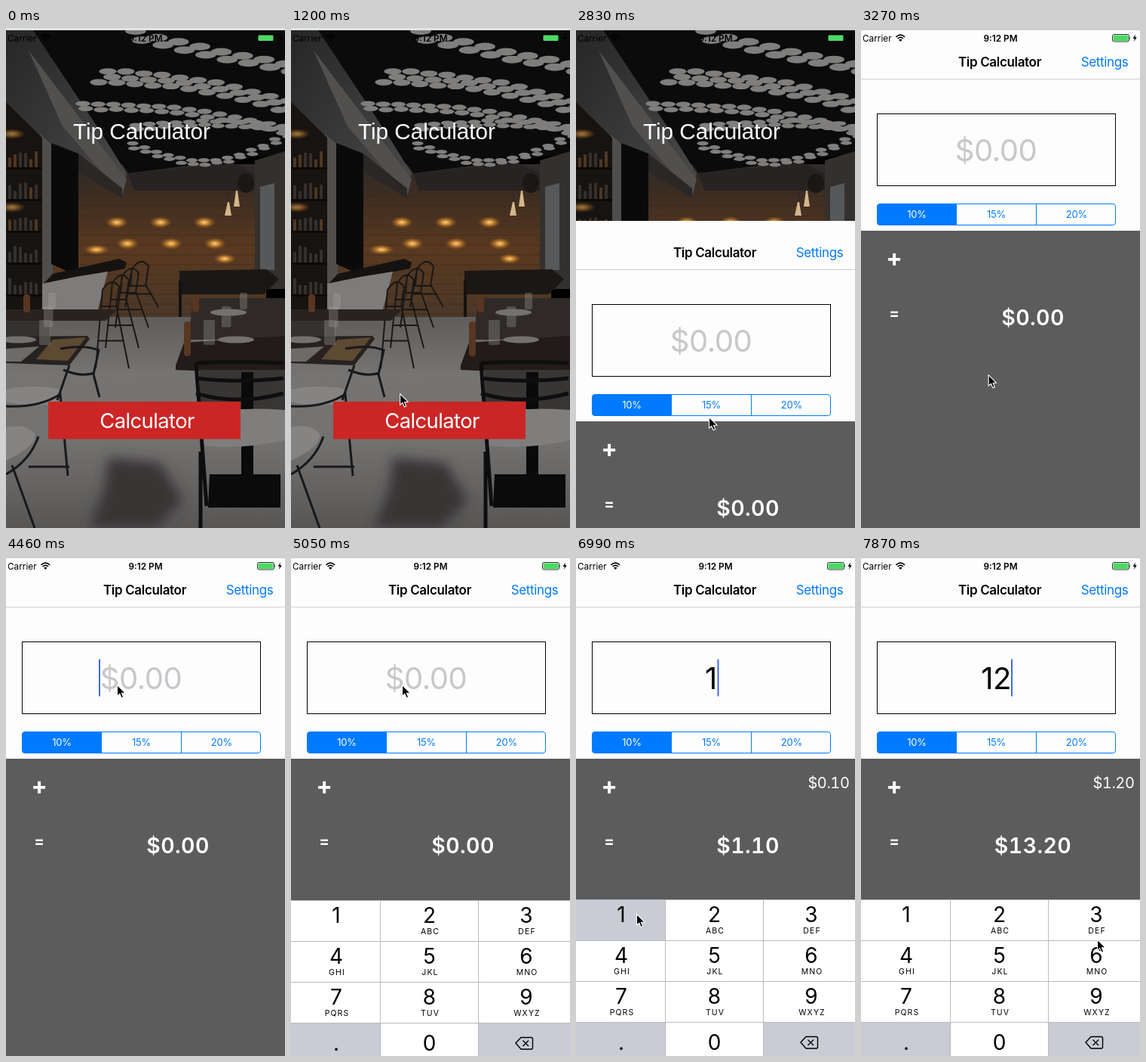
An HTML page for the animation above (8000 ms loop, 370 by 661 pixels).

```html
<!DOCTYPE html>
<html lang="en">
<head>
<meta charset="utf-8">
<title>Tip Calculator</title>
<style>
html, body { margin: 0; width: 100%; height: 100%; overflow: hidden; background: #000; }
svg { display: block; width: 370px; height: 661px; }
text { font-family: Inter, "Open Sans", sans-serif; white-space: pre; }
.mid { text-anchor: middle; }
.end { text-anchor: end; }
.title { font: 29.7px "Liberation Sans", Arial, sans-serif; }
.bar { font-size: 17px; letter-spacing: -.33px; }
.semi { font-weight: 600; }
.big { font-size: 40px; letter-spacing: -.5px; }
.seg { font-size: 13px; letter-spacing: -.2px; }
.total { font-size: 28.5px; font-weight: 600; letter-spacing: .4px; }
.tab { font-variant-numeric: tabular-nums; }
.digit { font-size: 28px; }
.sub { font-size: 10.5px; letter-spacing: 1.1px; }
</style>
</head>
<body>
<svg viewBox="0 0 370 661">
<defs>
  <linearGradient id="floor" x2="0" y2="1"><stop stop-color="#5b5958"/><stop offset=".3" stop-color="#757473"/><stop offset=".6" stop-color="#737271"/><stop offset="1" stop-color="#575655"/></linearGradient>
  <linearGradient id="wall" x2="0" y2="1"><stop stop-color="#2e2a28"/><stop offset=".2" stop-color="#3d2d22"/><stop offset=".55" stop-color="#59391f"/><stop offset="1" stop-color="#4b3828"/></linearGradient>
  <linearGradient id="side" x2="1" y2="1"><stop stop-color="#262626"/><stop offset="1" stop-color="#4b4a49"/></linearGradient>
  <radialGradient id="glow"><stop stop-color="#ffd080"/><stop offset=".4" stop-color="#c08030"/><stop offset="1" stop-color="#8a5420" stop-opacity="0"/></radialGradient>
  <filter id="soft" x="-30%" y="-30%" width="160%" height="160%"><feGaussianBlur stdDeviation="8"/></filter>
</defs>

<g id="home">
  <rect y="370" width="370" height="291" fill="url(#floor)"/>
  <path d="M60 180H345V382H60Z" fill="url(#wall)"/>
  <g id="planks" stroke="#33241a" stroke-opacity=".5"/>
  <path d="M0 0H40L160 192 152 224 60 158 0 105Z" fill="url(#side)"/>
  <path d="M30 30L160 200 154 222 75 130Z" fill="#51504f"/>
  <path d="M45 140L62 155V372H45Z" fill="#4f4e4d"/>
  <path d="M0 98L48 145V372H0Z" fill="#171311"/>
  <g id="shelf"/>
  <path d="M34 0H370V166L162 192Z" fill="#0b0b0b"/>
  <path d="M162 192L300 178 330 192V215H170Z" fill="#262322"/>
  <g id="discs" fill="#7f7e7d"/>
  <path d="M60 152L96 166V328L60 312Z" fill="#0b0a0a"/>
  <path d="M96 166L154 212V225L96 190Z" fill="#2a2726"/>
  <path d="M330 175L370 163V345H330Z" fill="#33302e"/>
  <path d="M337 210L356 205V320H337Z" fill="#56585a"/>
  <ellipse cx="318" cy="205" rx="11" ry="13" fill="#1a1716"/>
  <g id="lamps" fill="url(#glow)">
    <ellipse cx="120" cy="293" rx="17" ry="7"/><ellipse cx="290" cy="305" rx="15" ry="7"/>
  </g>
  <path d="M295 196V232M306 186V218" stroke="#2a2522"/>
  <path d="M294 230L290 248H299L296 230ZM305 215L302 236H310L307 215Z" fill="#d3b78b"/>
  <path d="M62 325L150 305 160 310 158 318 92 331 48 340Z" fill="#151312"/>
  <path d="M48 338L92 329 135 322 122 372H48Z" fill="#7d7c7a"/>
  <g id="stools" fill="none" stroke="#1a1716" stroke-width="2"/>
  <path d="M0 372H148L132 387H0Z" fill="#29231f"/>
  <path d="M0 387H58V408H0Z" fill="#35312e"/>
  <path d="M0 408L108 407 111 411 84 446 0 443Z" fill="#272220"/>
  <path d="M62 412L106 409 82 440 40 438Z" fill="#5d4a33"/>
  <path d="M0 424L44 421 20 441H0Z" fill="#6d6a67"/>
  <path d="M0 478Q35 470 75 478L68 496Q30 502 0 494ZM0 528Q25 522 38 536 42 552 0 572Z" fill="#858483"/>
  <path d="M72 424Q104 418 123 426L116 458 124 488M76 452Q100 462 117 456M84 446L68 492M0 500Q45 502 72 484L82 592M30 580H84M0 590Q32 572 43 540M8 578L38 661" fill="none" stroke="#1a1919" stroke-width="3"/>
  <path d="M135 568L205 575 235 625 200 661H110L130 610Z" fill="#383635" filter="url(#soft)"/>
  <path d="M230 321L346 319 362 332 342 352H230Z" fill="#1b1715"/>
  <path d="M231 334V382" stroke="#141211" stroke-width="4"/>
  <path d="M248 357H370V412H242Z" fill="#2f2a28"/>
  <path d="M236 416L370 407V458L225 452V446Z" fill="#221b19"/>
  <path d="M256 452H370V510H258Z" fill="#383635"/>
  <path d="M312 455H328V590H312Z" fill="#0b0a0a"/>
  <path d="M256 512Q300 500 370 505V545Q310 558 260 552Z" fill="#7f7e7d"/>
  <path d="M270 590H364V634H268Z" fill="#0c0b0b"/>
  <g id="rungs" fill="none" stroke="#0f0e0e" stroke-width="5"><path d="M252 443L266 632M258 560V661"/></g>
  <g id="table"/>
  <rect x="56" y="494" width="255" height="49.5" fill="#cb2625"/>
  <text class="mid" id="open" x="187" y="528.5" font-size="27.5" letter-spacing="-.62" fill="#fff">Calculator</text>
  <text class="mid title" x="180" y="147" fill="#fff">Tip Calculator</text>
</g>

<g id="modal">
  <rect y="3" width="370" height="661" fill="#fdfdfd"/>
  <rect y="67" width="370" height="1" fill="#cfcfd1"/>
  <text class="mid bar semi" x="184" y="51">Tip Calculator</text>
  <text class="end bar" x="354.5" y="51" fill="#007aff">Settings</text>
  <rect x="21.5" y="113.5" width="316" height="95" fill="none" stroke="#000"/>
  <text class="mid big" id="bill" x="179" y="176"></text>
  <rect id="caret" y="136.5" width="2" height="49" fill="#426be0"/>
  <rect x="21.5" y="232.5" width="316" height="28" rx="3.5" fill="none" stroke="#007aff"/>
  <path d="M127 232.5V260.5H25Q21.5 260.5 21.5 257V236Q21.5 232.5 25 232.5Z" fill="#007aff"/>
  <path d="M232.5 232V261" stroke="#007aff"/>
  <g class="mid seg" fill="#007aff">
    <text x="74" y="251" fill="#fff">10%</text><text x="179.5" y="251">15%</text><text x="286" y="251">20%</text>
  </g>
  <rect y="268" width="370" height="400" fill="#5c5c5c"/>
  <g fill="#fff">
    <text class="mid" x="44" y="314.5" font-size="32" font-weight="700">+</text>
    <text class="mid" x="44" y="384" font-size="20" font-weight="700">=</text>
    <text class="end tab" id="tip" x="362.5" y="307" font-size="20" letter-spacing="-.4"></text>
    <text class="mid total tab" id="total" x="228" y="393"></text>
  </g>
</g>

<g id="pad"></g>

<rect id="strip" width="370" height="3"/>
<g>
  <text x="2" y="17.5" font-size="11.8">Carrier</text>
  <path d="M46.5 11.8Q52.3 6.6 58.1 11.8M48.6 14Q52.3 10.8 56 14" fill="none" stroke="#000" stroke-width="1.6"/>
  <path d="M52.3 18L50 15.6Q52.3 14 54.6 15.6Z"/>
  <text class="mid semi" x="185" y="17.5" font-size="11.8">9:12 PM</text>
  <rect x="333.5" y="8.5" width="22" height="9.5" rx="2" fill="none" stroke="#000" stroke-width=".8"/>
  <rect x="334.5" y="9.5" width="20" height="7.5" rx="1" fill="#4cd964"/>
  <path d="M356.5 11.5Q358 13 356.5 15ZM364 8.5L360.5 13.8H363L361.8 18 365.8 12.3H363.3Z"/>
</g>
<path id="arrow" d="M0 0V14.6L3.3 11.6 5.7 17.2 8.2 16.1 5.9 10.7H10.6Z" stroke="#fff" stroke-width="1.1" stroke-linejoin="round"/>
</svg>

<script>
const LOOP = 8000;
const $ = id => document.getElementById(id);

function add(id, tag, attrs, text) {
  const el = document.createElementNS("http://www.w3.org/2000/svg", tag);
  for (const k in attrs) el.setAttribute(k, attrs[k]);
  if (text) el.textContent = text;
  return $(id).appendChild(el);
}

let seed = 7;
const rand = () => (seed = seed * 16807 % 2147483647) / 2147483647;

// Each ceiling band is a bent strip of packed discs, flatter and smaller further away
function band(x, y, drop, bend, rows) {
  const rx = 14 - y / 24;
  for (let r = 0; r < rows; r++) {
    for (let cx = x + r % 2 * rx - r * 6; cx < 380; cx += rx * 2.05) {
      const k = (cx - x) / (370 - x);
      add("discs", "ellipse", { cx, cy: y + drop * k + bend * Math.sin(k * Math.PI) + r * rx * .62 + rand() * 2, rx, ry: rx * .36 });
    }
  }
}
band(172, 4, 42, 2, 2);
band(135, 56, 38, -8, 3);
band(102, 100, 32, -10, 2);
band(172, 128, 0, -6, 2);
band(168, 152, -12, 28, 2);

for (let y = 222; y < 380; y += 13) add("planks", "path", { d: `M96 ${y}H330` });

for (let i = 0; i < 6; i++) {
  const row = i / 3 | 0;
  add("lamps", "ellipse", { cx: 147 + i % 3 * 58 + row * 14, cy: 257 + row * 28, rx: 15, ry: 8 });
}

for (let y = 184; y < 370; y += 42) {
  for (let x = 3; x < 44; x += 7) {
    const h = 10 + rand() * 12;
    add("shelf", "rect", { x, y: y - h, width: 4, height: h, fill: rand() < .3 ? "#50371f" : "#35302c" });
  }
  add("shelf", "rect", { y, width: 48, height: 3, fill: "#0c0a09" });
}
for (const cy of [140, 237]) add("shelf", "ellipse", { cx: 8, cy, rx: 18, ry: 7, fill: "url(#glow)", opacity: .55 });

// Bar stools: a curved back and splayed legs, nearer ones lower
for (let i = 0; i < 4; i++) {
  const x = 128 + i * 13, y = 346 - i * 9, h = 104 - i * 18;
  add("stools", "path", { d: `M${x} ${y}q12 -18 22 -4l-4 26h-20zl-9 ${h}M${x + 18} ${y + 20}l17 ${h - 20}M${x - 5} ${y + h * .65}h32` });
}
for (let y = 443; y < 490; y += 20) add("rungs", "path", { d: `M252 ${y}q54 ${(y - 450) / 2} 116 0` });

// Glasses, pepper mills and plates
for (let i = 0; i < 3; i++) {
  const s = 1 + i * .25;
  for (const x of [56 - i * 6, 310 - i * 24])
    add("table", "rect", { x, y: 350 + i * 18, width: 10 * s, height: 22 * s, rx: 2, fill: "#a5a3a0", opacity: .32 });
  add("table", "rect", { x: [23, 236, 247][i], y: 352 + i % 2 * 36, width: 9, height: 24 + i % 2 * 22, rx: 4, fill: "#583622" });
  add("table", "ellipse", { cx: [16, 305, 295][i], cy: i < 2 ? 412 : 376, rx: 24, ry: 4.5, fill: "#74716e" });
}

// Number pad
const GREY = "#c9ccd4";
add("pad", "rect", { y: 454, width: 370, height: 210, fill: "#b9bbc0" });
const keys = ["1", "2ABC", "3DEF", "4GHI", "5JKL", "6MNO", "7PQRS", "8TUV", "9WXYZ", ".", "0", ""].map((label, i) => {
  const col = i % 3, row = i / 3 | 0, last = row === 3;
  const x = col && 130 * col - 11, mid = 60 + 126 * col - (col === 1 ? 2.5 : 0);
  const fill = last && label !== "0" ? GREY : "#fff";
  const key = add("pad", "rect", { x, y: 455 + 54 * row, width: col ? 129 : 118, height: 53, fill });
  add("pad", "text", { class: "mid digit", x: mid, y: last ? 653 : 484 + 54 * row }, label[0]);
  add("pad", "text", { class: "mid sub", x: mid + 1, y: 499 + 54 * row }, label.slice(1));
  return key;
});
add("pad", "path", { d: "M298 643L305 635.5H318.5Q320.5 635.5 320.5 637.5V649Q320.5 651 318.5 651H305ZM307.5 639.5L315 647M315 639.5L307.5 647", fill: "none", stroke: "#000", "stroke-width": 1.4 });

// Pointer moves: start, end, x, y
const MOVES = [
  [750, 1790, 173, 513], [1790, 1940, 176.5, 514.5], [2980, 3260, 170.5, 495.5], [3260, 3560, 155, 90],
  [3560, 4010, 147.5, 170.5], [5800, 6690, 80.5, 473.5], [6990, 7280, 155, 484], [7580, 7860, 313.5, 507]
];
const TYPED = [6990, 7730];
const TAP = 2530, FOCUS = 4460;

// The screen refreshes about every 148 ms
const TICK = 148.2;
const snap = t => 750 + Math.floor((t - 750) / TICK) * TICK;

// Critically damped spring: the part of the way still to go
function rest(t, start) {
  const u = Math.max(0, t - start) * .01826;
  return (1 + u) * Math.exp(-u);
}

function pointer(t) {
  let x = 22, y = 357;
  for (const [from, to, toX, toY] of MOVES) {
    const left = 1 - Math.min(1, Math.max(0, (t - from) / (to - from)));
    const k = 1 - left ** 3;
    x += (toX - x) * k;
    y += (toY - y) * k;
  }
  return [t < 750 ? -40 : x, y];
}

const shift = (el, x, y) => el.setAttribute("transform", `translate(${x} ${y})`);
const money = v => "$" + v.toFixed(2);

function draw(t) {
  const s = snap(t);
  shift($("modal"), 0, Math.round(661 * rest(s, 2710)));
  shift($("pad"), 0, Math.round(210 * rest(s, 4600)));
  shift($("arrow"), ...pointer(s));
  $("open").setAttribute("opacity", t >= TAP && t < TAP + 290 ? .3 : 1);
  $("strip").setAttribute("fill", t < 2680 ? "#dfe6e2" : "#cdcdcd");

  const count = TYPED.filter(at => t >= at).length;
  const bill = "12".slice(0, count);
  $("bill").textContent = bill || money(0);
  $("bill").setAttribute("fill", bill ? "#000" : "#c7c7cb");
  $("tip").textContent = bill && money(bill * .1);
  $("total").textContent = money(bill * 1.1);

  const lit = count || t >= FOCUS && (t - FOCUS) % 1040 < 590;
  $("caret").setAttribute("x", count ? 176 + 11.5 * count : 123);
  $("caret").setAttribute("opacity", lit ? 1 : 0);
  TYPED.forEach((at, i) => keys[i].setAttribute("fill", Math.abs(t - at) < 140 ? GREY : "#fff"));
}

const begin = performance.now();
function frame() {
  draw((performance.now() - begin) % LOOP);
  requestAnimationFrame(frame);
}
frame();
</script>
</body>
</html>
```
